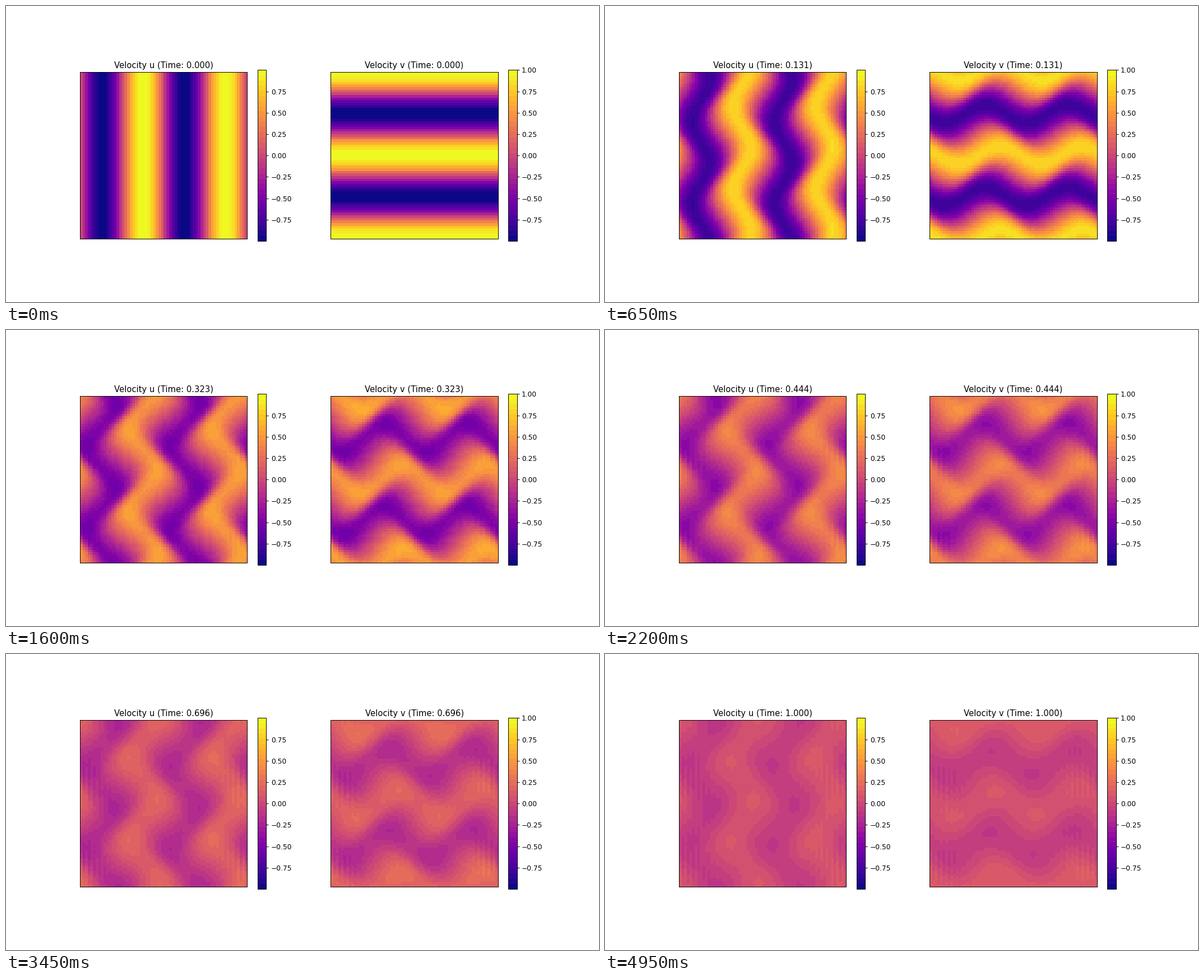
These frames come from a looping animation (1058 px wide and 529 px high, 5 s). A matplotlib script:

```python
import numpy as np
import matplotlib.pyplot as plt
from matplotlib.animation import FuncAnimation

FRAMES = 100
INTERVAL = 50          # ms
GRID = 64
LENGTH = 2.0
VISCOSITY = 0.04
STEPS = 1000
DT = 1.0 / STEPS
LEVELS = 33


def slope(field, axis):
    """Central difference on a wrapped grid."""
    h = LENGTH / (GRID - 1)
    return (np.roll(field, -1, axis) - np.roll(field, 1, axis)) / (2 * h)


def rate(field, u, v):
    """Advection plus diffusion; u carries along rows, v along columns."""
    d_row, d_col = slope(field, 0), slope(field, 1)
    spread = slope(d_row, 0) + slope(d_col, 1)
    return VISCOSITY * spread - u * d_row - v * d_col


def simulate():
    x, y = np.meshgrid(*[np.linspace(0, LENGTH, GRID)] * 2)
    u, v = -np.sin(2 * np.pi * x), np.cos(2 * np.pi * y)
    history = [(u, v)]
    for _ in range(STEPS):
        u, v = u + DT * rate(u, u, v), v + DT * rate(v, u, v)
        history.append((u, v))
    return history


history = simulate()

plt.rcParams["font.family"] = "DejaVu Sans"
fig, axes = plt.subplots(1, 2, figsize=(12, 6), dpi=1058 / 12)
cmap = plt.get_cmap("plasma", LEVELS)

images = []
for ax, field in zip(axes, history[0]):
    image = ax.imshow(field, cmap=cmap, origin="lower", interpolation="nearest",
                      vmin=field.min(), vmax=field.max())
    ax.set_xticks([])
    ax.set_yticks([])
    fig.colorbar(image, ax=ax, shrink=0.75)
    images.append(image)


def update(frame):
    step = frame * STEPS // (FRAMES - 1)
    for name, ax, image, field in zip("uv", axes, images, history[step]):
        image.set_data(field)
        ax.set_title(f"Velocity {name} (Time: {step * DT:.3f})")
    return images


anim = FuncAnimation(fig, update, frames=FRAMES, interval=INTERVAL,
                     repeat=True, repeat_delay=0, blit=False)
plt.show()
```
